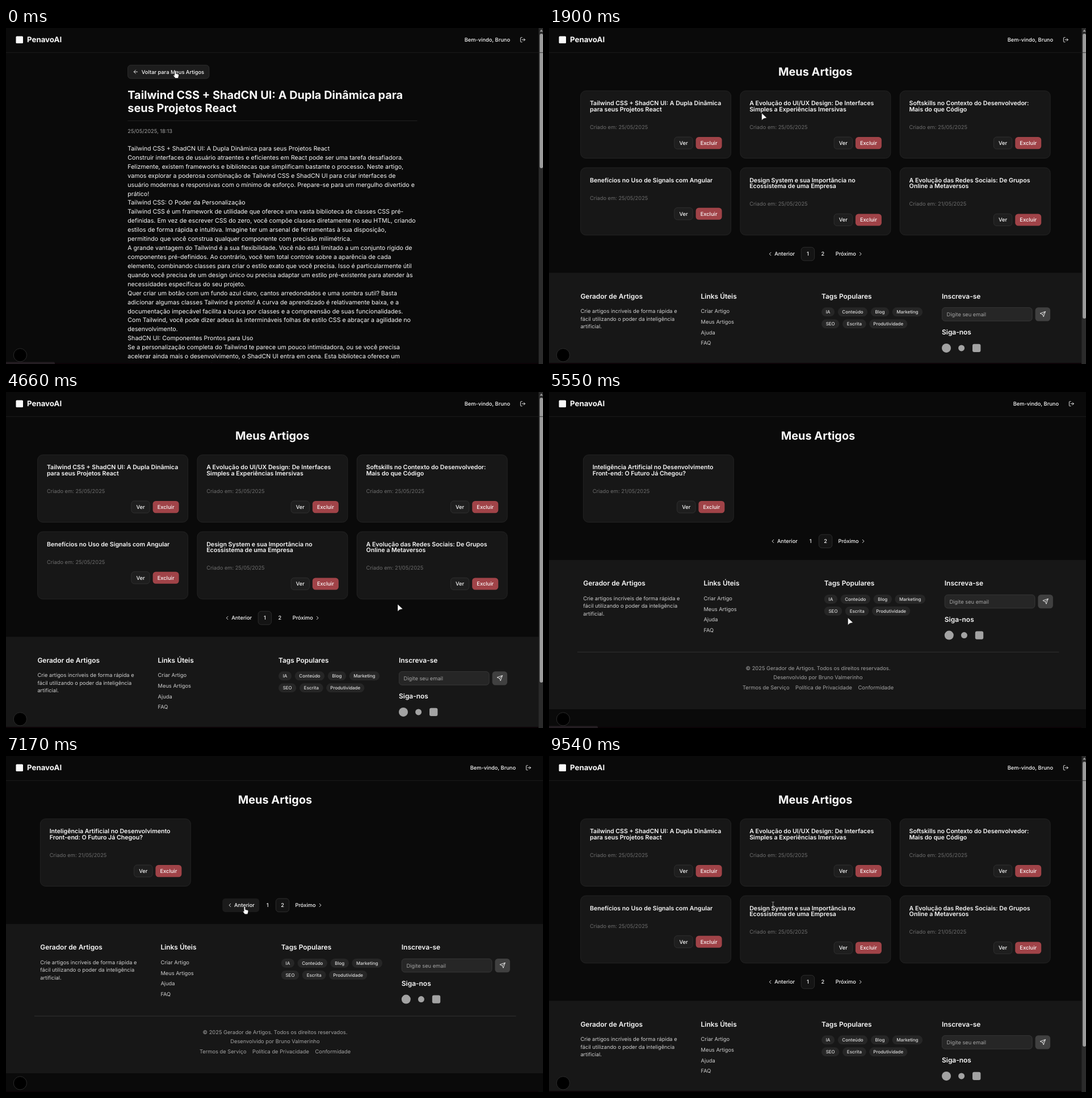
Write an HTML page that moves like this. It is 946x592 px and loops after 9610 ms.

```html
<!DOCTYPE html>
<html lang="pt-BR">
<head>
<meta charset="utf-8">
<title>Meus Artigos</title>
<style>
  html, body { margin: 0; width: 100%; height: 100%; overflow: hidden; background: #0a0a0a; }
  svg { display: block; width: 946px; height: 592px; }
  text {
    font-family: Inter, "Liberation Sans", sans-serif;
    font-optical-sizing: none;
    text-rendering: geometricPrecision;
    white-space: pre;
  }
  .icon { fill: none; stroke: #fafafa; stroke-width: 2; stroke-linecap: round; stroke-linejoin: round; }
</style>
</head>
<body>
<svg id="stage" viewBox="0 0 946 592"></svg>
<script>
const LOOP = 9610;
const XS = 7.96, SM = 9.29, MD = 10.62, LG = 11.94, XL = 13.27, H1 = 19.9;
const WHITE = '#fafafa', SOFT = '#cfcfcf', MUTED = '#a3a3a3', DIM = '#6c6c6c';

// Text is placed by the middle of its line box.
const text = (x, mid, size, str, { w = 400, c = WHITE, a = 'start' } = {}) =>
  `<text x="${x}" y="${(mid + size * .364).toFixed(2)}" font-size="${size}" font-weight="${w}" fill="${c}" text-anchor="${a}">${str}</text>`;
const lines = (x, mid, size, step, list, style) =>
  list.map((s, i) => text(x, mid + i * step, size, s, style)).join('');
const rect = (x, y, w, h, r, fill, stroke = 'none') =>
  `<rect x="${x}" y="${y}" width="${w}" height="${h}" rx="${r}" fill="${fill}" stroke="${stroke}" stroke-width=".7"/>`;
const circle = (x, y, r, fill, stroke = 'none') =>
  `<circle cx="${x}" cy="${y}" r="${r}" fill="${fill}" stroke="${stroke}"/>`;
const rule = (x1, x2, y, c) => `<path d="M${x1} ${y}H${x2}" stroke="${c}" stroke-width=".8"/>`;
const icon = (x, y, d) =>
  `<path class="icon" transform="translate(${x} ${y}) scale(.4425) translate(-12 -12)" d="${d}"/>`;
const group = (id, body, dx = 0, dy = 0) => `<g id="${id}" transform="translate(${dx} ${dy})">${body}</g>`;

const CHEV_L = 'm15 18-6-6 6-6', CHEV_R = 'm9 18 6-6-6-6';
const ARROW_L = 'm12 19-7-7 7-7M19 12H5';
const LOGOUT = 'M9 21H5a2 2 0 0 1-2-2V5a2 2 0 0 1 2-2h4M16 17l5-5-5-5M21 12H9';
const SEND = 'm22 2-7 20-4-9-9-4ZM22 2 11 13';

const scrollbar = end =>
  rect(938.4, 0, 8, 592, 0, '#2b2b2b') + rect(940.2, 10, 6, end - 10, 3, '#9c9c9c') +
  '<path d="M940.4 6.4h5.4L943.1 2.6Z" fill="#9c9c9c"/>';

function header() {
  return rule(0, 946, 43.3, '#222') + rect(17.5, 14.5, 12.5, 12.5, 1.5, WHITE) +
    text(37, 20.6, XL, 'PenavoAI', { w: 700 }) +
    group('user', text(898, 20.8, SM, 'Bem-vindo, Bruno', { w: 500, a: 'end' }) + icon(920.4, 20.7, LOGOUT));
}

function article() {
  const body = [
    'Tailwind CSS + ShadCN UI: A Dupla Dinâmica para seus Projetos React',
    'Construir interfaces de usuário atraentes e eficientes em React pode ser uma tarefa desafiadora.',
    'Felizmente, existem frameworks e bibliotecas que simplificam bastante o processo. Neste artigo,',
    'vamos explorar a poderosa combinação de Tailwind CSS e ShadCN UI para criar interfaces de',
    'usuário modernas e responsivas com o mínimo de esforço. Prepare-se para um mergulho divertido e',
    'prático!',
    'Tailwind CSS: O Poder da Personalização',
    'Tailwind CSS é um framework de utilidade que oferece uma vasta biblioteca de classes CSS pré-',
    'definidas. Em vez de escrever CSS do zero, você compõe classes diretamente no seu HTML, criando',
    'estilos de forma rápida e intuitiva. Imagine ter um arsenal de ferramentas à sua disposição,',
    'permitindo que você construa qualquer componente com precisão milimétrica.',
    'A grande vantagem do Tailwind é a sua flexibilidade. Você não está limitado a um conjunto rígido de',
    'componentes pré-definidos. Ao contrário, você tem total controle sobre a aparência de cada',
    'elemento, combinando classes para criar o estilo exato que você precisa. Isso é particularmente útil',
    'quando você precisa de um design único ou precisa adaptar um estilo pré-existente para atender às',
    'necessidades específicas do seu projeto.',
    'Quer criar um botão com um fundo azul claro, cantos arredondados e uma sombra sutil? Basta',
    'adicionar algumas classes Tailwind e pronto! A curva de aprendizado é relativamente baixa, e a',
    'documentação impecável facilita a busca por classes e a compreensão de suas funcionalidades.',
    'Com Tailwind, você pode dizer adeus às intermináveis folhas de estilo CSS e abraçar a agilidade no',
    'desenvolvimento.',
    'ShadCN UI: Componentes Prontos para Uso',
    'Se a personalização completa do Tailwind te parece um pouco intimidadora, ou se você precisa',
    'acelerar ainda mais o desenvolvimento, o ShadCN UI entra em cena. Esta biblioteca oferece um',
    'conjunto de componentes pré-construídos, elegantemente projetados e totalmente personalizáveis.'
  ];
  return rect(214.6, 65.4, 143.2, 23.6, 5.3, '#1d1d1d', '#3a3a3a') + icon(228.4, 77.2, ARROW_L) +
    text(238.8, 77.2, SM, 'Voltar para Meus Artigos', { w: 500 }) +
    lines(214.3, 117.3, H1, 23.9, ['Tailwind CSS + ShadCN UI: A Dupla Dinâmica para', 'seus Projetos React'], { w: 700 }) +
    rule(214.3, 724.5, 163.5, '#262626') +
    text(214.3, 181.3, SM, '25/05/2025, 18:13', { c: MUTED }) +
    lines(214.3, 212.1, MD, 15.92, body) + scrollbar(247);
}

function card(col, row, title, date) {
  const x = 60.4 + col * 281.3, y = 110.7 + row * 135.4, end = y + 10.75 * title.length;
  const ver = x + 165.2, del = x + 203, btn = end + 59.8;
  return rect(x, y, 265, 118.8, 9.3, '#171717', '#2c2c2c') +
    lines(x + 16.3, y + 21.7, MD, 10.7, title, { w: 600 }) +
    text(x + 16.3, end + 42.5, SM, 'Criado em: ' + date, { c: DIM }) +
    rect(ver, btn, 32.4, 21.2, 5.3, '#1e1e1e', '#383838') +
    text(ver + 16.2, btn + 10.6, SM, 'Ver', { w: 500, a: 'middle' }) +
    rect(del, btn, 46, 21.2, 5.3, '#a04348') +
    text(del + 23, btn + 10.6, SM, 'Excluir', { w: 500, a: 'middle' });
}

function pager(active, y, hoverId, hoverX) {
  const centers = { 1: 460.7, 2: 487.1 };
  const number = n => text(centers[n], y, SM, n, { w: 500, a: 'middle' });
  return `<g id="${hoverId}">${rect(hoverX, y - 12, 65, 24, 5.3, '#1b1b1b')}</g>` +
    rect(centers[active] - 11.7, y - 11.8, 23.4, 23.6, 5.3, '#141414', '#3a3a3a') +
    icon(394.4, y, CHEV_L) + text(402, y, SM, 'Anterior', { w: 500 }) + number(1) + number(2) +
    text(509.5, y, SM, 'Próximo', { w: 500 }) + icon(553.6, y, CHEV_R);
}

function footer(y) {
  const head = (x, mid, s) => text(x, mid, LG, s, { w: 600 });
  const tag = (x, top, w, s) => rect(x, top, w, 16, 8, '#262626') +
    text(x + w / 2, top + 8, XS, s, { w: 500, c: '#dedede', a: 'middle' });
  const soft = { c: SOFT }, mid = { c: MUTED, a: 'middle' };
  return group('footer' + y,
    rect(-10, 0, 970, 263, 0, '#171717') +
    head(60.2, 41, 'Gerador de Artigos') +
    lines(60.2, 67.8, SM, 13.27, ['Crie artigos incríveis de forma rápida e', 'fácil utilizando o poder da inteligência', 'artificial.'], soft) +
    head(272.4, 41, 'Links Úteis') +
    lines(272.4, 67.8, SM, 18.55, ['Criar Artigo', 'Meus Artigos', 'Ajuda', 'FAQ'], soft) +
    head(484.8, 41, 'Tags Populares') +
    tag(484.8, 61, 23.2, 'IA') + tag(513.6, 61, 52.4, 'Conteúdo') + tag(571.6, 61, 32.4, 'Blog') + tag(609.4, 61, 53.6, 'Marketing') +
    tag(484.8, 82, 31.4, 'SEO') + tag(521.8, 82, 41.8, 'Escrita') + tag(569, 82, 67.2, 'Produtividade') +
    head(696.8, 41, 'Inscreva-se') +
    rect(697.2, 61.3, 158.8, 23.6, 5.3, '#262626', '#414141') +
    text(705.4, 73.3, SM, 'Digite seu email', { c: MUTED }) +
    rect(861.4, 61, 26.5, 24.2, 5.3, '#404040') + icon(874.7, 73, SEND) +
    head(696.8, 104.5, 'Siga-nos') +
    circle(704.8, 132.6, 8, MUTED) + circle(731.4, 132.6, 5.5, MUTED) + rect(750.8, 125.4, 14.4, 14.4, 3, MUTED) +
    rule(50, 898.5, 162.2, '#3a3a3a') +
    text(474, 190.4, SM, '© 2025 Gerador de Artigos. Todos os direitos reservados.', mid) +
    text(474, 206.6, SM, 'Desenvolvido por Bruno Valmerinho', mid) +
    text(341, 225, SM, 'Termos de Serviço', { c: MUTED }) +
    text(434, 225, SM, 'Política de Privacidade', { c: MUTED }) +
    text(544.6, 225, SM, 'Conformidade', { c: MUTED }), 0, y);
}

const heading = () => text(474, 77.2, H1, 'Meus Artigos', { w: 700, a: 'middle' });

function firstPage() {
  const may25 = '25/05/2025', may21 = '21/05/2025';
  return heading() +
    card(0, 0, ['Tailwind CSS + ShadCN UI: A Dupla Dinâmica', 'para seus Projetos React'], may25) +
    card(1, 0, ['A Evolução do UI/UX Design: De Interfaces', 'Simples a Experiências Imersivas'], may25) +
    card(2, 0, ['Softskills no Contexto do Desenvolvedor:', 'Mais do que Código'], may25) +
    card(0, 1, ['Benefícios no Uso de Signals com Angular'], may25) +
    card(1, 1, ['Design System e sua Importância no', 'Ecossistema de uma Empresa'], may25) +
    card(2, 1, ['A Evolução das Redes Sociais: De Grupos', 'Online a Metaversos'], may21) +
    pager(1, 398.1, 'hoverNext', 501.6) + footer(431.3);
}

function secondPage() {
  return heading() +
    card(0, 0, ['Inteligência Artificial no Desenvolvimento', 'Front-end: O Futuro Já Chegou?'], '21/05/2025') +
    pager(2, 262.9, 'hoverPrev', 381.2) + footer(296);
}

const pointers =
  '<path id="arrow" d="M0 0V12.4L3.4 9.5 8.8 8.2Z" fill="#fff" stroke="#111" stroke-width=".4"/>' +
  '<path id="hand" d="M-1.3 1a1.3 1.3 0 0 1 2.6 0V5l4 1q1.3.4 1.2 1.8L5.9 11 5 13.2H.3L-3.4 8.4q.6-1.4 2.1-.2Z" fill="#fff" stroke="#111" stroke-width=".7"/>' +
  '<path id="beam" d="M-2.2-5.3h4.4M0-5.3V5.3M-2.2 5.3h4.4" fill="none" stroke="#8c8c8c"/>';

document.getElementById('stage').innerHTML =
  rect(0, 0, 946, 592, 0, '#0a0a0a') +
  group('article', article()) +
  group('first', firstPage(), -4.8) +
  group('second', secondPage()) +
  group('bar', scrollbar(512)) +
  header() +
  rect(0, 590, 938, 2, 0, '#0c0307') +
  group('status', rect(-2, 588.4, 88, 6, 2, '#241d22')) +
  circle(24.9, 576.3, 11.6, '#000', '#2b2b2b') +
  group('pointer', pointers);

const $ = id => document.getElementById(id);
const TO_LIST = 410, TO_SECOND = 5480, TO_FIRST = 8320;

// Pointer stops: time, x, y
const path = [
  [0, 298, 75.3], [760, 298, 75.3], [1500, 335, 125], [2400, 430, 185], [3150, 500.8, 200.6],
  [3420, 500.8, 200.6], [4050, 600, 300], [4620, 690, 374], [4750, 690, 374], [5150, 526.6, 398],
  [5900, 526.6, 398], [7000, 420.4, 265.6], [8500, 420.4, 265.6], [9400, 394.6, 262.6], [LOOP, 394.6, 262.6]
];

function pointerAt(t) {
  const i = path.findIndex(p => p[0] > t);
  const [t0, x0, y0] = path[i - 1], [t1, x1, y1] = path[i];
  const u = (t - t0) / (t1 - t0), k = u * u * (3 - 2 * u);
  return [x0 + (x1 - x0) * k, y0 + (y1 - y0) * k];
}

const within = (t, a, b) => t >= a && t < b;
const show = (id, on) => { $(id).style.display = on ? '' : 'none'; };

function draw(now) {
  const t = now % LOOP;
  const second = within(t, TO_SECOND, TO_FIRST), onArticle = t < TO_LIST;
  const onNext = within(t, 5080, TO_SECOND), onPrev = within(t, 6930, TO_FIRST);
  const hand = onArticle || onNext || onPrev, beam = t >= TO_FIRST;
  show('article', onArticle);
  show('first', !onArticle && !second);
  show('second', second);
  show('bar', !onArticle && !second);
  show('hoverNext', onNext);
  show('hoverPrev', onPrev);
  show('status', t < 1000 || within(t, TO_SECOND, 6500) || within(t, TO_FIRST, 8900));
  show('hand', hand);
  show('beam', beam);
  show('arrow', !hand && !beam);
  $('user').setAttribute('transform', `translate(${second ? 0 : -10} 0)`);
  $('pointer').setAttribute('transform', `translate(${pointerAt(t).map(v => v.toFixed(2)).join(' ')})`);
}

const start = performance.now();
function tick() {
  draw(performance.now() - start);
  requestAnimationFrame(tick);
}
tick();
</script>
</body>
</html>
```
